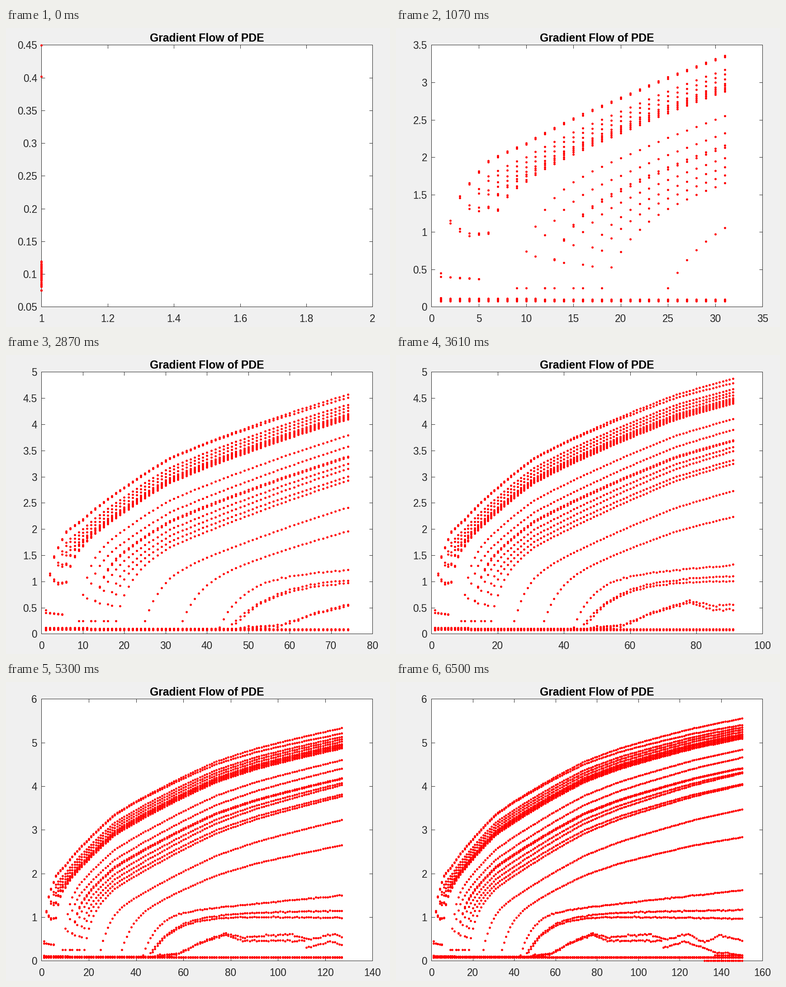
Animation, 849 px wide and 660 px high, one loop 8.53 s. Source, as a matplotlib script:

```python
import numpy as np
import matplotlib.pyplot as plt
from matplotlib.animation import FuncAnimation

W, H, DPI = 849, 660, 64
PX = 72 / DPI                      # one pixel in points
LOOP, FRAMES = 8530, 170
STEPS = 150
INK, PAPER = "#262626", "#f0f0f0"
LEFT, RIGHT, TOP, BOTTOM = 78.4, 810.4, 37.4, 615.4

# (animation step, columns plotted so far)
PACE = np.array([(0, 1), (21, 31), (36, 50), (57, 74), (71, 91), (105, 127),
                 (126, 149), (128, 149), (129, 150)])
# Highest value in a few columns
CREST = np.array([(1, .4499), (2, 1.15), (3, 1.48), (6, 1.955), (10, 2.19),
                  (20, 2.8), (31, 3.36), (50, 3.945), (74, 4.57), (91, 4.87),
                  (127, 5.335), (150, 5.555)])

rng = np.random.default_rng(4)
xs, ys = [], []


def add(n, v):
    xs.extend(n)
    ys.extend(v)


def columns(first, last=STEPS):
    return np.arange(first, last + 1)


def crest(n):
    """Growth is close to linear in sqrt(n)."""
    return np.interp(np.sqrt(n), np.sqrt(CREST[:, 0]), CREST[:, 1])


def climb(start, value, near, far):
    """Leave the floor and settle at a slowly changing gap below the crest."""
    n = columns(start)
    goal = crest(n) - np.interp(n, [40, STEPS], [near, far])
    lag = goal[0] - value
    add(n, goal - lag * np.exp((start - n) / (1 + start / 10)))


def saturate(start, level, tau, slope):
    n = columns(start)
    rise = level * (1 - np.exp((start - 1 - n) / tau))
    add(n, rise + slope * (n - 50) + rng.normal(0, .006, n.size))


def wander(knots, values):
    n = columns(knots[0])
    add(n, np.interp(n, knots, values) + rng.normal(0, .01, n.size))


def band(first, last, low, high, rows):
    for v in np.linspace(low, high, rows):
        n = columns(first, last)
        add(n, np.full(n.size, v))


# Upper bundle: two more branches rise at each of the first columns
for i in range(10):
    climb(1 + i // 2,
          np.interp(i, [0, 1, 9], [.4499, .402, .37]),
          np.interp(i, [0, 1, 2, 5, 9], [0, .02, .19, .38, .48]),
          np.interp(i, [0, 1, 5, 9], [0, .15, .36, .46]))

# Later branches: start column, early gap, final gap
for start, near, far in [(9, .81, .715), (10, 1.04, .895), (12, 1.2, 1.135),
                         (12, 1.23, 1.145), (13, 1.37, 1.23),
                         (15, 1.49, 1.255), (16, 1.6, 1.5), (18, 1.7, 1.525),
                         (25, 2.19, 2.085), (34, 2.56, 2.72)]:
    climb(start, .25, near, far)

# Low branches that level off
saturate(43, 1.1, 6, .0052)
saturate(45, 1.08, 11, .0009)
saturate(46, 1.04, 10, -.0007)
wander([48, 58, 66, 78, 85, 105, 113, 124, 132, 139, 150],
       [.125, .17, .4, .63, .54, .62, .5, .62, .42, .59, .47])
wander([48, 58, 66, 78, 85, 111, 112, 122, 130, 137, 150],
       [.11, .155, .39, .61, .46, .46, .3, .45, .32, .2, .13])

# Resting values near zero
add(np.ones(60), np.clip(rng.normal(.1, .011, 60), .0755, .1265))
band(2, 11, .078, .112, 6)
band(12, 55, .076, .102, 5)
band(56, STEPS, .072, .088, 3)
band(137, STEPS, .13, .13, 1)
band(132, STEPS, 0, 0, 1)

order = np.argsort(xs, kind="stable")
X, Y = np.array(xs)[order], np.array(ys)[order]


def nice_ticks(lo, hi, most):
    """Tightest round limits with 3 to `most` intervals."""
    fits = []
    for e in range(-3, 3):
        for m in (1, 2, 5):
            step = m * 10.0 ** e
            a, b = np.floor(lo / step + 1e-9), np.floor(hi / step) + 1
            if 3 <= b - a <= most:
                fits.append((round((b - a) * step, 9), step, a, b))
    _, step, a, b = min(fits)
    return step * np.arange(a, b + 1)


plt.rcParams["font.family"] = "Liberation Sans"
fig = plt.figure(figsize=(W / DPI, H / DPI), dpi=DPI, facecolor=PAPER)
ax = fig.add_axes([LEFT / W, 1 - BOTTOM / H,
                   (RIGHT - LEFT) / W, (BOTTOM - TOP) / H])
for spine in ax.spines.values():
    spine.set(linewidth=PX, color=INK)
ax.tick_params(direction="in", top=True, right=True, length=7.5 * PX, width=PX,
               color=INK, labelcolor=INK, labelsize=22.5 * PX)
ax.tick_params(axis="x", pad=16 * PX)
ax.tick_params(axis="y", pad=9.5 * PX)
fig.text(444.5 / W, 1 - 29.5 / H, "Gradient Flow of PDE", ha="center",
         va="baseline", weight="bold", size=24.75 * PX, color="black")
dots, = ax.plot([], [], "o", color="red", ms=4.9 * PX, mew=0,
                clip_on=False, zorder=5)


def label(ticks):
    return [f"{t:g}" for t in ticks]


def draw(k):
    n = int(round(np.interp(k, PACE[:, 0], PACE[:, 1])))
    end = np.searchsorted(X, n, side="right")
    dots.set_data(X[:end], Y[:end])
    xt = nice_ticks(1, n if n > 1 else 1.99, 9)
    yt = nice_ticks(Y[:end].min(), Y[:end].max(), 10)
    ax.set_xticks(xt, label(xt))
    ax.set_yticks(yt, label(yt))
    ax.set_xlim(xt[0], xt[-1])
    ax.set_ylim(yt[0], yt[-1])
    return dots,


anim = FuncAnimation(fig, draw, frames=FRAMES, interval=LOOP / FRAMES,
                     repeat=True)
plt.show()
```
